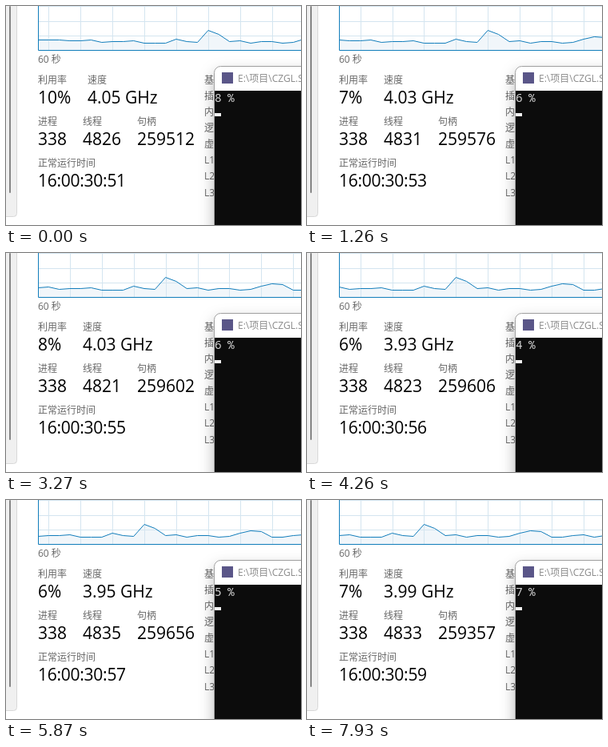
These frames come from a looping animation (369 by 274 pixels, 8000 ms). An HTML page:

```html
<!DOCTYPE html>
<html lang="zh">
<head>
<meta charset="utf-8">
<title>CPU</title>
<style>
  html, body { margin: 0; width: 100%; height: 100%; overflow: hidden; background: #fff; }
  svg { display: block; width: 369px; height: 274px; }
  text { font-family: "Open Sans", "Noto Sans CJK SC", "Noto Sans CJK", sans-serif; white-space: pre; }
  .label { font-size: 12px; fill: #686868; }
  .value { font-size: 21px; fill: #000; }
  #uptime { letter-spacing: -.27px; }
  .window { filter: drop-shadow(0 8px 9px rgba(0, 0, 0, .28)); }
  .title { font-size: 12px; fill: #8c8c8c; }
  #out { font: 300 14.5px "Noto Sans Mono", monospace; letter-spacing: -.7px; fill: #d4d4d4; }
</style>
</head>
<body>
<svg viewBox="0 0 369 274">
  <rect width="369" height="274" fill="#fff"/>

  <path d="M0 0H13.5V259.5a4 4 0 0 1-4 4H0Z" fill="#f0f0f0"/>
  <path d="M13.5 0V259.5a4 4 0 0 1-4 4H0" fill="none" stroke="#d8d8d8"/>
  <rect x="4" width="2" height="234" rx="1" fill="#868686"/>

  <path id="area" fill="#f1f6fa"/>
  <path id="grid" fill="none" stroke="#d4e5f0"/>
  <path id="line" fill="none" stroke="#117dbb"/>
  <path d="M40.5 0V55.5H369" fill="none" stroke="#117dbb"/>

  <g class="label">
    <text x="40" y="70.5">60 秒</text>
    <text x="40" y="97">利用率</text>
    <text id="speedLabel" y="97">速度</text>
    <text x="40" y="149">进程</text>
    <text x="96" y="149">线程</text>
    <text x="164" y="149">句柄</text>
    <text x="40" y="201">正常运行时间</text>
    <g id="specs"></g>
  </g>
  <g class="value">
    <text id="usage" x="40" y="122"></text>
    <text id="speed" y="122"></text>
    <text x="40" y="174">338</text>
    <text id="threads" x="96" y="174"></text>
    <text id="handles" x="164" y="174"></text>
    <text id="uptime" x="40" y="226"></text>
  </g>

  <path class="window" d="M260.5 340V83.5a8 8 0 0 1 8-8H440V340Z" fill="#fff" stroke="#a0a0a0"/>
  <rect x="261" y="106" width="108" height="168" fill="#0c0c0c"/>
  <rect x="270" y="83" width="14" height="14" fill="#5a5688"/>
  <text class="title" x="290" y="94.5">E:\项目\CZGL.S</text>
  <text id="out" x="261" y="120"></text>
  <rect x="261" y="134" width="8" height="4" fill="#f2f2f2"/>
</svg>
<script>
  const $ = id => document.getElementById(id);
  const LOOP = 8000, LEFT = 40, BASE = 55, CELL = 39.91, STEP = CELL / 3;

  // Start time, usage, GHz, threads, handles; one row per second of uptime
  const stats = [
    [0, 10, '4.05', 4826, 259512],
    [260, 11, '4.06', 4829, 259560],
    [1260, 7, '4.03', 4831, 259576],
    [2270, 9, '4.08', 4828, 259608],
    [3270, 8, '4.03', 4821, 259602],
    [4260, 6, '3.93', 4823, 259606],
    [5270, 6, '3.95', 4835, 259656],
    [6270, 7, '3.97', 4834, 259487],
    [7270, 7, '3.99', 4833, 259357]
  ];

  const output = [
    [0, '8 %'], [590, ''], [660, '6 %'], [1670, '5 %'],
    [2670, ''], [2740, '6 %'], [3730, ''], [3800, '4 %'],
    [5800, ''], [5870, '5 %'], [6870, '4 %'], [7930, '7 %']
  ];

  // Heights of the usage curve, one sample per second
  const samples = [
    13, 13, 13, 12, 12, 13, 10, 11, 11, 12, 9, 9, 9, 14, 11, 10, 25, 20,
    11, 12, 9, 11, 11, 9, 10, 14, 17, 16, 9, 9, 11, 12, 9, 11, 10
  ];

  $('specs').innerHTML = ['基', '插', '内', '逻', '虚', 'L1', 'L2', 'L3']
    .map((s, i) => `<text x="248" y="${97 + Math.floor(i * 20.15)}">${s}</text>`).join('');

  const indexAt = (rows, t) => rows.findLastIndex(row => row[0] <= t);

  function drawGraph(tick) {
    const points = samples.slice(tick, tick + 26)
      .map((h, i) => `${(LEFT + i * STEP).toFixed(1)} ${BASE - h + .5}`).join('L');
    $('line').setAttribute('d', 'M' + points);
    $('area').setAttribute('d', `M${LEFT} ${BASE}L${points}V${BASE}Z`);

    let d = 'M40 .5H369M40 19.5H369M40 37.5H369';
    const phase = (4 - tick % 3) % 3 * STEP;
    for (let x = LEFT + phase; x < 369; x += CELL) d += `M${Math.round(x) + .5} 0V${BASE}`;
    $('grid').setAttribute('d', d);
  }

  function showStats(tick) {
    const [, usage, ghz, threads, handles] = stats[tick];
    const x = usage > 9 ? 102 : 96;
    $('speedLabel').setAttribute('x', x);
    $('speed').setAttribute('x', x);
    $('usage').textContent = usage + '%';
    $('speed').textContent = ghz + ' GHz';
    $('threads').textContent = threads;
    $('handles').textContent = handles;
    $('uptime').textContent = '16:00:30:' + (51 + tick);
    drawGraph(tick);
  }

  const start = performance.now();
  let lastTick = -1, lastOut = -1;

  function frame(now) {
    const t = Math.max(0, now - start) % LOOP;
    const tick = indexAt(stats, t), out = indexAt(output, t);
    if (tick !== lastTick) showStats(lastTick = tick);
    if (out !== lastOut) $('out').textContent = output[lastOut = out][1];
    requestAnimationFrame(frame);
  }
  frame(start);
</script>
</body>
</html>
```
